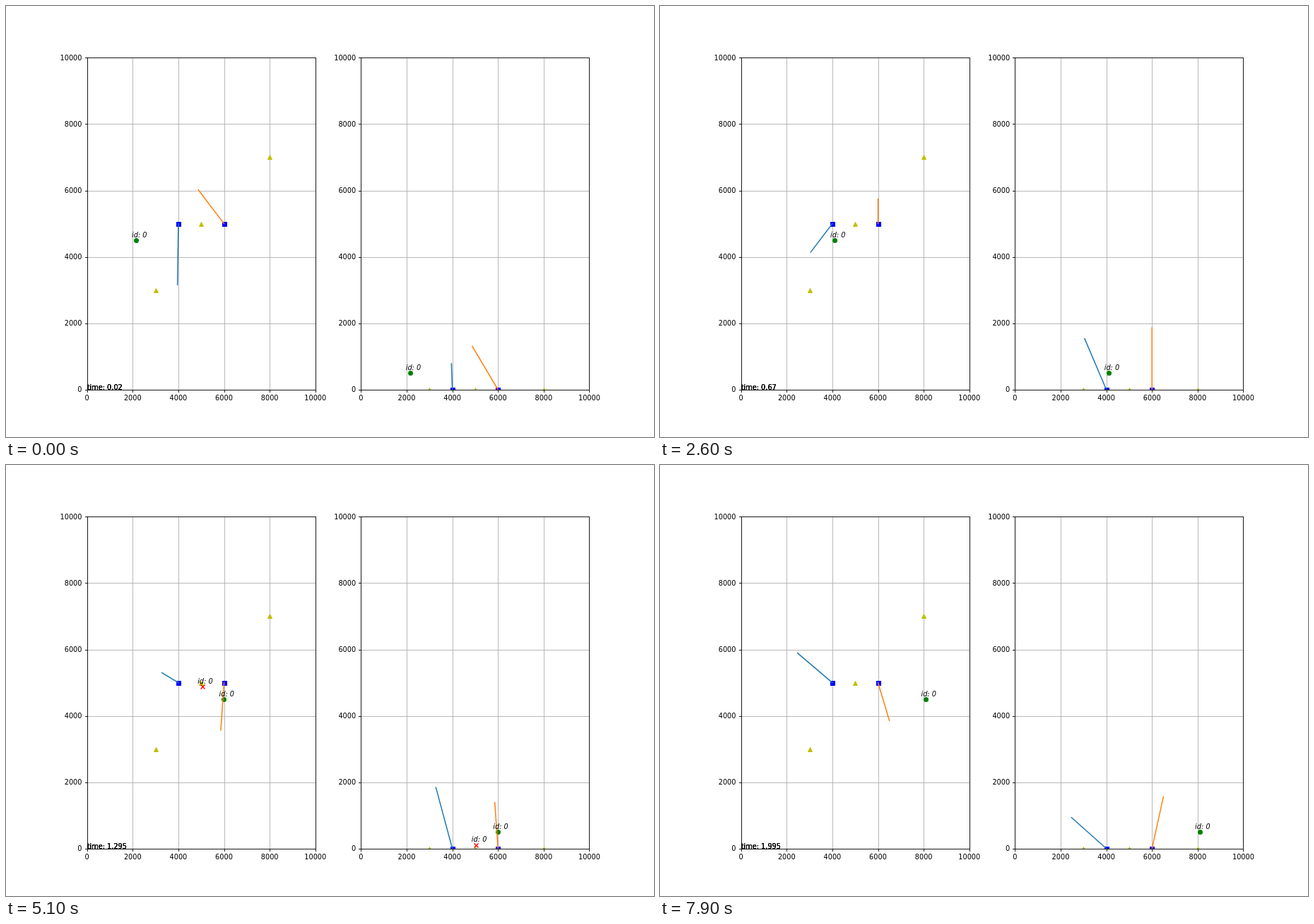
These frames come from a looping animation (917 px wide and 611 px high, 8000 ms). An HTML page with a canvas:

```html
<!DOCTYPE html>
<html lang="en">
<head>
<meta charset="utf-8">
<title>Beam scan</title>
<style>
html, body { margin: 0; width: 100%; height: 100%; overflow: hidden; background: #fff; }
canvas { display: block; }
</style>
</head>
<body>
<canvas id="stage" width="917" height="611"></canvas>
<script>
const ctx = document.getElementById('stage').getContext('2d');
const STEP = 100, STEPS = 80, REACH = 2000;
const LEFT = [114.7, 502.4], WIDTH = 323.04, BOTTOM = 543.79, HEIGHT = 470.47;
const FONT = '9.75px "DejaVu Sans", sans-serif';

// Each beam rests on a few headings (x, y of a unit vector pointing upwards)
// and swings out to one side between them.
const restSteps = [0, 15, 26, 35, 51, 65, 79];
const beams = [
  { x: 4000, color: '#1f77b4', swing: [0, 2],
    rests: [[-.02, -.92], [.32, -.91], [-.475, -.43], [-.18, .4], [-.36, .15], [-.625, .255], [-.763, .446]] },
  { x: 6000, color: '#ff7f0e', swing: [1.2, 0],
    rests: [[-.563, .51], [-.757, .383], [0, .37], [.033, -.143], [-.07, -.715], [.822, -.414], [.249, -.573]] }
];
const posts = [[3000, 3000], [5000, 5000], [8000, 7000]];

const px = (side, v) => LEFT[side] + v * WIDTH / 10000;
const py = v => BOTTOM - v * HEIGHT / 10000;
const snap = v => Math.round(v) + 0.5;

function line(x1, y1, x2, y2, color, width) {
  ctx.strokeStyle = color;
  ctx.lineWidth = width;
  ctx.beginPath();
  ctx.moveTo(x1, y1);
  ctx.lineTo(x2, y2);
  ctx.stroke();
}

function text(str, x, y, align = 'left', style = '') {
  ctx.font = style + FONT;
  ctx.textAlign = align;
  ctx.fillStyle = '#000';
  ctx.fillText(str, x, Math.round(y));
}

const lift = ([x, y]) => [x, y, Math.sqrt(1 - x * x - y * y)];

function heading({ rests, swing }, n) {
  const i = Math.max(1, restSteps.findIndex(s => s >= n));
  const f = (n - restSteps[i - 1]) / (restSteps[i] - restSteps[i - 1]);
  const a = lift(rests[i - 1]), b = lift(rests[i]);
  const out = Math.sin(Math.PI * f) ** 2;
  const d = a.map((v, j) => v + (b[j] - v) * f + out * (swing[j] || 0));
  const len = Math.hypot(...d);
  return d.map(v => v / len * REACH);
}

function triangle(x, y) {
  ctx.fillStyle = ctx.strokeStyle = '#bfbf00';
  ctx.lineWidth = 1;
  ctx.beginPath();
  ctx.moveTo(x, y - 3);
  ctx.lineTo(x - 3, y + 3);
  ctx.lineTo(x + 3, y + 3);
  ctx.closePath();
  ctx.fill();
  ctx.stroke();
}

function square(x, y) {
  ctx.fillStyle = '#00f';
  ctx.fillRect(x - 3.5, y - 3.5, 7, 7);
}

function circle(x, y) {
  ctx.fillStyle = '#008000';
  ctx.beginPath();
  ctx.arc(x, y, 3.5, 0, 7);
  ctx.fill();
}

function cross(x, y) {
  line(x - 3, y - 3, x + 3, y + 3, '#f00', 1.4);
  line(x - 3, y + 3, x + 3, y - 3, '#f00', 1.4);
}

function panel(side, n) {
  const X = v => px(side, v);
  const Y = p => py(side ? p[2] : p[1]);
  const mark = (shape, p) => shape(snap(X(p[0])), snap(Y(p)));
  const target = [2160 + 75 * n, 4500, 500];
  const k = n - 44;
  const estimate = k >= 0 && k <= 28 && [4826 + 31 * k, 5000 - 16.7 * k, 16 * k];
  const x0 = snap(X(0)), x1 = snap(X(10000)), y0 = snap(py(0)), y1 = snap(py(10000));

  ctx.save();
  ctx.beginPath();
  ctx.rect(x0, y1, x1 - x0, y0 - y1);
  ctx.clip();
  for (let v = 2000; v < 10000; v += 2000) {
    line(snap(X(v)), y0, snap(X(v)), y1, '#b0b0b0', 0.9);
    line(x0, snap(py(v)), x1, snap(py(v)), '#b0b0b0', 0.9);
  }
  for (const [x, y] of posts) mark(triangle, [x, y, 0]);
  for (const b of beams) mark(square, [b.x, 5000, 0]);
  mark(circle, target);
  if (estimate) mark(cross, estimate);
  ctx.lineCap = 'square';
  for (const b of beams) {
    const [dx, dy, dz] = heading(b, n);
    line(X(b.x), Y([b.x, 5000, 0]), X(b.x + dx), Y([0, 5000 + dy, dz]), b.color, 1.5);
  }
  ctx.restore();

  ctx.strokeStyle = '#000';
  ctx.lineWidth = 0.9;
  ctx.strokeRect(x0, y1, x1 - x0, y0 - y1);
  for (let v = 0; v <= 10000; v += 2000) {
    const x = snap(X(v)), y = snap(py(v));
    line(x, y0, x, y0 + 3.5, '#000', 0.9);
    line(x0 - 3.5, y, x0, y, '#000', 0.9);
    text(v, X(v), 559, 'center');
    text(v, X(0) - 7.2, py(v) + 3.6, 'right');
  }
  for (const p of [target, estimate]) {
    if (p) text('id: 0', X(p[0] - 200), Y(p) - 4.5, 'left', 'italic ');
  }
}

function draw(now) {
  const n = Math.floor(now / STEP) % STEPS;
  ctx.fillStyle = '#fff';
  ctx.fillRect(0, 0, 917, 611);
  panel(0, n);
  panel(1, n);
  // Repeated printing darkens the clock
  const clock = 'time: ' + +(0.02 + 0.025 * n).toFixed(3);
  for (let i = 0; i < 3; i++) text(clock, LEFT[0], BOTTOM);
}

const start = performance.now();
function tick() {
  draw(performance.now() - start);
  requestAnimationFrame(tick);
}
tick();
</script>
</body>
</html>
```
